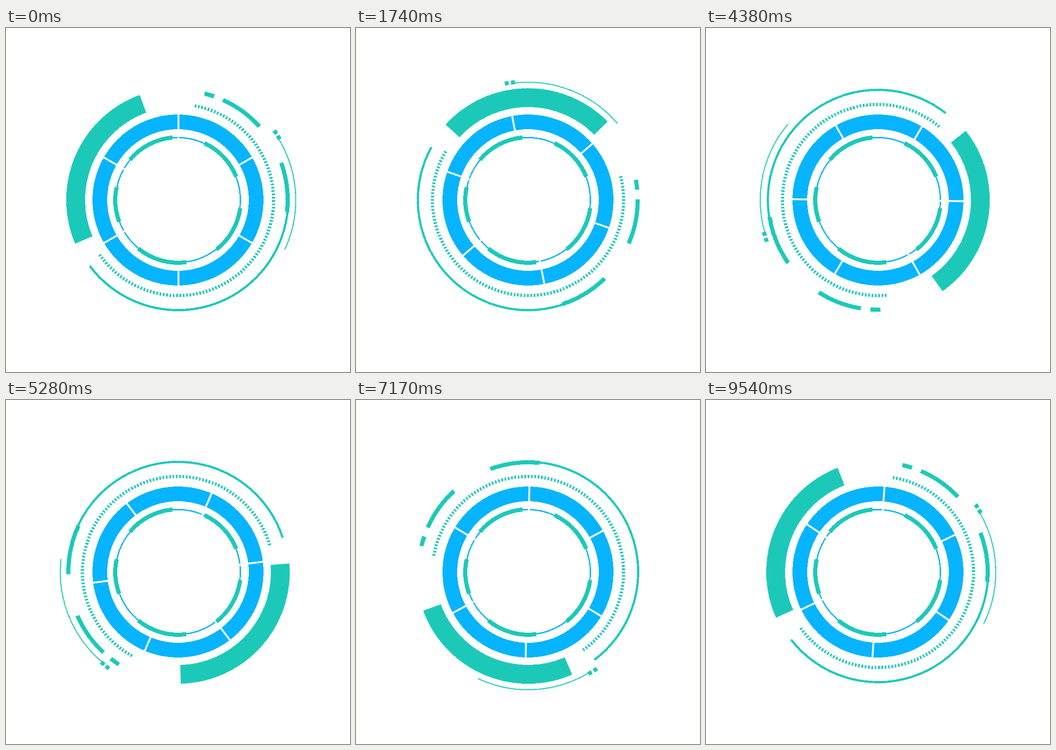
Recreate the animation shown at these times as an HTML page. Size 748 by 748 pixels, loop 9.57 s.

```html
<!DOCTYPE html>
<html lang="en">
<head>
<meta charset="utf-8">
<title>Rotating dial</title>
<style>
  html, body { margin: 0; width: 100%; height: 100%; overflow: hidden; background: #fff; }
  svg { display: block; width: 100vw; height: 100vh; shape-rendering: crispEdges; }
  circle, path { fill: none; }
  .green { stroke: #1cc9b9; }
  .blue { stroke: #06b4ff; }
  .gaps { stroke: #fff; stroke-width: 4; }
  .cw, .ccw, .gaps { transform-origin: 0 0; animation: turn 9570ms steps(319) infinite; }
  .ccw { animation-direction: normal; animation-name: turn-back; }
  .gaps { animation-name: spin-back; animation-timing-function: steps(206); }
  @keyframes turn { from { transform: rotate(0deg); } to { transform: rotate(360deg); } }
  @keyframes turn-back { from { transform: rotate(0deg); } to { transform: rotate(-360deg); } }
  @keyframes spin-back {
    0% { transform: rotate(0deg); animation-timing-function: steps(206); }
    64.5768% { transform: rotate(-464.7deg); animation-timing-function: steps(113); }
    100% { transform: rotate(-718.2deg); }
  }
</style>
</head>
<body>
<svg viewBox="-374 -374 748 748">
  <!-- Arcs are circles measured in degrees: dash = span, rotate = start -->
  <circle class="blue" r="170" stroke-width="32"/>
  <circle class="blue" r="135.7" stroke-width="2.8"/>

  <g class="gaps">
    <path id="bar" d="M.5 -190V-128M.5 128V190"/>
    <use href="#bar" transform="rotate(60)"/>
    <use href="#bar" transform="rotate(120)"/>
  </g>

  <g class="green" stroke-width="9">
    <g>
      <circle r="136.3" pathLength="360" stroke-dasharray="45 315" transform="rotate(220)"/>
      <circle r="136.3" pathLength="360" stroke-dasharray="43.3 316.7" transform="rotate(-65)"/>
      <circle r="136.3" pathLength="360" stroke-dasharray="44.7 315.3" transform="rotate(7.6)"/>
      <circle r="136.3" pathLength="360" stroke-dasharray="47 313" transform="rotate(82.4)"/>
      <circle r="136.3" pathLength="360" stroke-dasharray="31.8 328.2" transform="rotate(159.8)"/>
    </g>

    <g class="cw">
      <circle r="222.5" stroke-width="41" pathLength="360" stroke-dasharray="93 267" transform="rotate(157)"/>
      <path d="M207.8 0A207.8 207.8 0 1 1 -146.94 -146.94" stroke-width="7"
            pathLength="225" stroke-dasharray="1 1" transform="rotate(-79.9)"/>
      <circle r="238.5" pathLength="360" stroke-dasharray="5.2 354.8" transform="rotate(-76)"/>
      <circle r="238.5" pathLength="360" stroke-dasharray="23.7 336.3" transform="rotate(-65.8)"/>
      <circle r="238.5" pathLength="360" stroke-dasharray="26.1 333.9" transform="rotate(-19.8)"/>
      <circle r="239.5" stroke-width="4.8" pathLength="360" stroke-dasharray="137.2 222.8" transform="rotate(6)"/>
    </g>

    <g class="ccw">
      <circle r="258" pathLength="360" stroke-dasharray="1.9 358.1" transform="rotate(-35.8)"/>
      <circle r="257.7" pathLength="360" stroke-dasharray="1.9 358.1" transform="rotate(-32.8)"/>
      <circle r="256" stroke-width="2.2" pathLength="360" stroke-dasharray="56.3 303.7" transform="rotate(-31.2)"/>
    </g>
  </g>
</svg>
</body>
</html>
```
